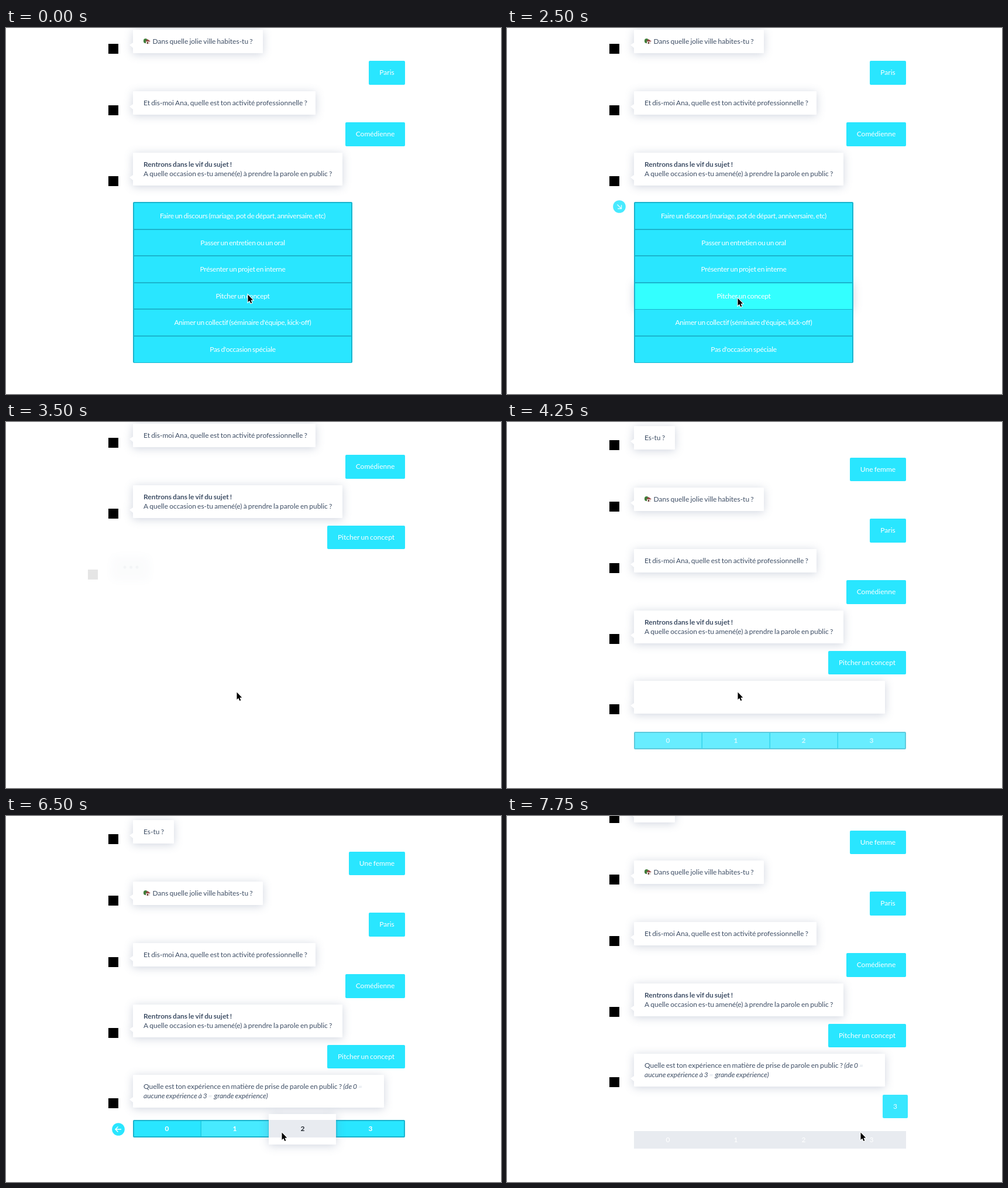
An HTML page with a canvas for the animation above (8 s loop, 846 px wide and 625 px high).

```html
<!DOCTYPE html>
<html lang="fr">
<head>
<meta charset="utf-8">
<title>Questionnaire</title>
<style>
html, body { margin: 0; width: 100%; height: 100%; overflow: hidden; background: #fff; }
canvas { display: block; }
</style>
</head>
<body>
<canvas id="stage" width="846" height="625"></canvas>
<script>
const g = document.getElementById('stage').getContext('2d');
const CYAN = '#29e6ff', BORDER = '#1bb4cd', INK = '#3f4f66', PALE = '#e8ebf0';
const STEP = 250, STEPS = 32, LEFT = 217, RIGHT = 682;

const options = [
  'Faire un discours (mariage, pot de départ, anniversaire, etc)',
  'Passer un entretien ou un oral',
  'Présenter un projet en interne',
  'Pitcher un concept',
  "Animer un collectif (séminaire d'équipe, kick-off)",
  "Pas d'occasion spéciale"
];

// Runs fn with its own alpha and origin.
function group(alpha, x, y, fn) {
  g.save();
  g.globalAlpha *= alpha;
  g.translate(x, y);
  fn();
  g.restore();
}

function text(str, x, y, { color = INK, style = '', align = 'left', spacing = 0 } = {}) {
  g.font = `${style} 12px Lato, sans-serif`;
  g.letterSpacing = spacing + 'px';
  g.wordSpacing = '-0.9px';
  g.textAlign = align;
  g.fillStyle = color;
  g.fillText(str, x, y);
  return x + g.measureText(str).width;
}

function rect(x, y, w, h, color, r = 0) {
  g.fillStyle = color;
  g.beginPath();
  g.roundRect(x, y, w, h, r);
  g.fill();
}

function outline(x, y, w, h) {
  g.strokeStyle = BORDER;
  g.lineWidth = 2;
  g.beginPath();
  g.roundRect(x + 1, y + 1, w - 2, h - 2, 1);
  g.stroke();
}

function shadowed(fn) {
  g.save();
  g.shadowColor = 'rgba(100,115,150,.3)';
  g.shadowBlur = 15;
  g.shadowOffsetY = 2;
  fn();
  g.restore();
}

function bubble(y, w, h, body) {
  const b = y + h;
  rect(175, b - 16, 17, 17, '#000');
  shadowed(() => {
    g.fillStyle = '#fff';
    g.beginPath();
    g.roundRect(LEFT, y, w, h, 1);
    g.moveTo(LEFT, b - 18);
    g.lineTo(211, b - 14);
    g.lineTo(LEFT, b - 9);
    g.fill();
  });
  body(y + 24);
}

function answer(str, y, w, h, entering) {
  group(entering ? 0.93 : 1, entering ? 3 : 0, 0, () => {
    rect(RIGHT - w, y, w, h, CYAN, 2);
    text(str, RIGHT - w / 2, y + 24, { color: '#fff', align: 'center' });
  });
}

function house(x, y) {
  rect(x, y - 5, 7, 8, '#3f7d3a', 3.5);
  rect(x + 4, y - 1, 7, 5, '#e6dcd8');
  g.fillStyle = '#9b4a48';
  g.beginPath();
  g.moveTo(x + 3, y);
  g.lineTo(x + 7, y - 4);
  g.lineTo(x + 12, y);
  g.fill();
  rect(x + 6, y + 1, 2, 3, '#6b3f34');
}

function experience(y) {
  const it = { style: 'italic' }, faint = { style: 'italic', color: '#d3dce6' };
  let x = text('Quelle est ton expérience en matière de prise de parole en public ? ', 235, y);
  x = text('(de 0 ', x, y, it);
  text('=', x, y, faint);
  x = text('aucune expérience à 3 ', 235, y + 16, it);
  x = text('=', x, y + 16, faint);
  text(' grande expérience)', x, y + 16, it);
}

function typing(y, alpha, dx) {
  group(alpha, dx, 0, () => bubble(y, 62, 40, () => {
    for (let i = 0; i < 3; i++) rect(235.5 + i * 10.5, y + 17.5, 5, 5, '#aeb7c4', 2.5);
  }));
}

function list(y, hover) {
  const rowH = 45.6, w = 375;
  const rowY = i => Math.round(y + i * rowH);
  if (hover) shadowed(() => rect(LEFT, rowY(3), w, 46, CYAN));
  rect(LEFT, y, w, 275, BORDER, 2);
  options.forEach((str, i) => {
    const top = rowY(i) + 2;
    rect(LEFT + 2, top, w - 4, rowY(i + 1) - top, CYAN);
    if (i === 3 && hover) group(hover, 0, 0, () => rect(LEFT + 2, top, w - 4, 44, '#3ff'));
    text(str, LEFT + w / 2, top + 26, { color: '#fff', align: 'center', spacing: -0.28 });
  });
}

function fadedList(y) {
  rect(LEFT, y, 375, 275, PALE);
  options.forEach((str, i) => text(str, LEFT + 187.5, Math.round(y + i * 45.6) + 28,
    { color: '#fff', align: 'center', spacing: -0.28 }));
}

function scale(y, hover, leaving) {
  rect(LEFT + 2, y + 2, 461, 26, CYAN);
  for (let i = 0; i < 4; i++) {
    const x = LEFT + i * 116;
    if (i) rect(x - 0.5, y + 2, 1.5, 26, '#20c9e2');
    if (i === leaving) rect(x + 1, y + 2, 114, 26, 'rgba(255,255,255,.14)');
  }
  outline(LEFT, y, 465, 30);
  if (hover >= 0) {
    const x = LEFT + hover * 116;
    shadowed(() => rect(x, y - 10, 115, 52, '#fff'));
    rect(x, y, 115, 30, PALE);
  }
  for (let i = 0; i < 4; i++) {
    text(i, 275 + i * 116, y + 19,
      { color: i === hover ? '#252b33' : '#fff', style: 'bold', align: 'center' });
  }
}

function fadedScale(y) {
  rect(LEFT, y, 465, 30, PALE);
  for (let i = 0; i < 4; i++) text(i, 275 + i * 116, y + 19, { color: '#fff', align: 'center' });
}

function backButton(y, alpha, angle, color = CYAN) {
  group(alpha, 192, y, () => {
    rect(-10.8, -10.8, 21.6, 21.6, color, 10.8);
    g.rotate(angle * Math.PI / 180);
    g.strokeStyle = '#fff';
    g.lineWidth = 1.4;
    g.beginPath();
    g.moveTo(5, 0);
    g.lineTo(-5, 0);
    g.moveTo(-0.5, -4.5);
    g.lineTo(-5, 0);
    g.lineTo(-0.5, 4.5);
    g.stroke();
  });
}

function pointer(x, y) {
  group(1, x + 0.5, y + 0.5, () => {
    const p = [[0, 0], [0, 12.6], [2.8, 10], [4.8, 14.6], [6.9, 13.7], [4.9, 9.2], [8.7, 9]];
    g.beginPath();
    p.forEach(q => g.lineTo(...q));
    g.closePath();
    g.lineWidth = 2;
    g.strokeStyle = '#fff';
    g.stroke();
    g.fillStyle = '#000';
    g.fill();
  });
}

function scrollAt(s) {
  if (s < 11) return -109;
  if (s === 11) return -135;
  if (s === 12) return -200;
  if (s < 17) return -214;
  return s < 31 ? 0 : -36;
}

function pointerAt(s) {
  if (s < 2) return [413, 455];
  if (s < 21) return [394, 461];
  const xs = [281, 281, 281, 290, 390, 471, 490, 580, 604];
  return [xs[Math.min(s - 21, 8)], 540];
}

function hoverAt(s) {
  if (s < 22 || s > 30) return -1;
  return Math.floor((pointerAt(s)[0] - LEFT) / 116);
}

function chat(s) {
  bubble(7, 70, 40, y => text('Es-tu ?', 235, y));
  answer('Une femme', 61, 96, 40);
  bubble(112, 222, 40, y => {
    house(235, y - 4);
    text('Dans quelle jolie ville habites-tu ?', 250.5, y);
  });
  answer('Paris', 165, 62, 41);
  bubble(217, 312, 40, y => text('Et dis-moi Ana, quelle est ton activité professionnelle ?', 235, y));
  answer('Comédienne', 270, 102, 41);
  bubble(322, 358, 56, y => {
    text('Rentrons dans le vif du sujet !', 235, y, { style: 'bold' });
    text('A quelle occasion es-tu amené(e) à prendre la parole en public ?', 235, y + 16);
  });
  if (s >= 11) answer('Pitcher un concept', 391, 133, 40, s === 11);
  if (s >= 14 && s < 17) typing(442, [0.1, 0.85, 1][s - 14], [-35, -4, 0][s - 14]);
  if (s >= 17) {
    const shown = [0, 0.6, 1][Math.min(s - 17, 2)];
    bubble(442, 429, 56, y => group(shown, 0, 0, () => experience(y)));
  }
  if (s === 31) answer('3', 512, 43, 40, true);
}

function controls(s) {
  if (s < 11) list(297, Math.max(0, Math.min(1, (s - 4) / 3)));
  else if (s === 11) fadedList(326);
  else if (s === 31) fadedScale(538);
  else if (s >= 17) {
    const k = Math.min(s - 17, 2), hover = hoverAt(s), before = hoverAt(s - 1);
    group([0.7, 0.95, 1][k], 0, [10, 2, 0][k],
      () => scale(519, hover, before !== hover ? before : -1));
  }

  // The back arrow turns in, and turns on as it leaves.
  const enter = (start, y) => {
    const k = Math.min(s - start, 3);
    backButton(y, [1, 0.85, 0.97, 1][k], [135, 35, 8, 0][k], k ? CYAN : '#e4e8ec');
  };
  if (s >= 5 && s < 10) enter(5, 305);
  if (s === 10) backButton(305, 0.86, -135);
  if (s >= 21 && s < 31) enter(21, 535);
}

function frame(now) {
  const s = Math.floor(now / STEP) % STEPS;
  g.fillStyle = '#fff';
  g.fillRect(0, 0, 846, 625);
  group(1, 0, scrollAt(s), () => chat(s));
  controls(s);
  pointer(...pointerAt(s));
}

const start = performance.now();
function tick() {
  frame(performance.now() - start);
  requestAnimationFrame(tick);
}
tick();
</script>
</body>
</html>
```
